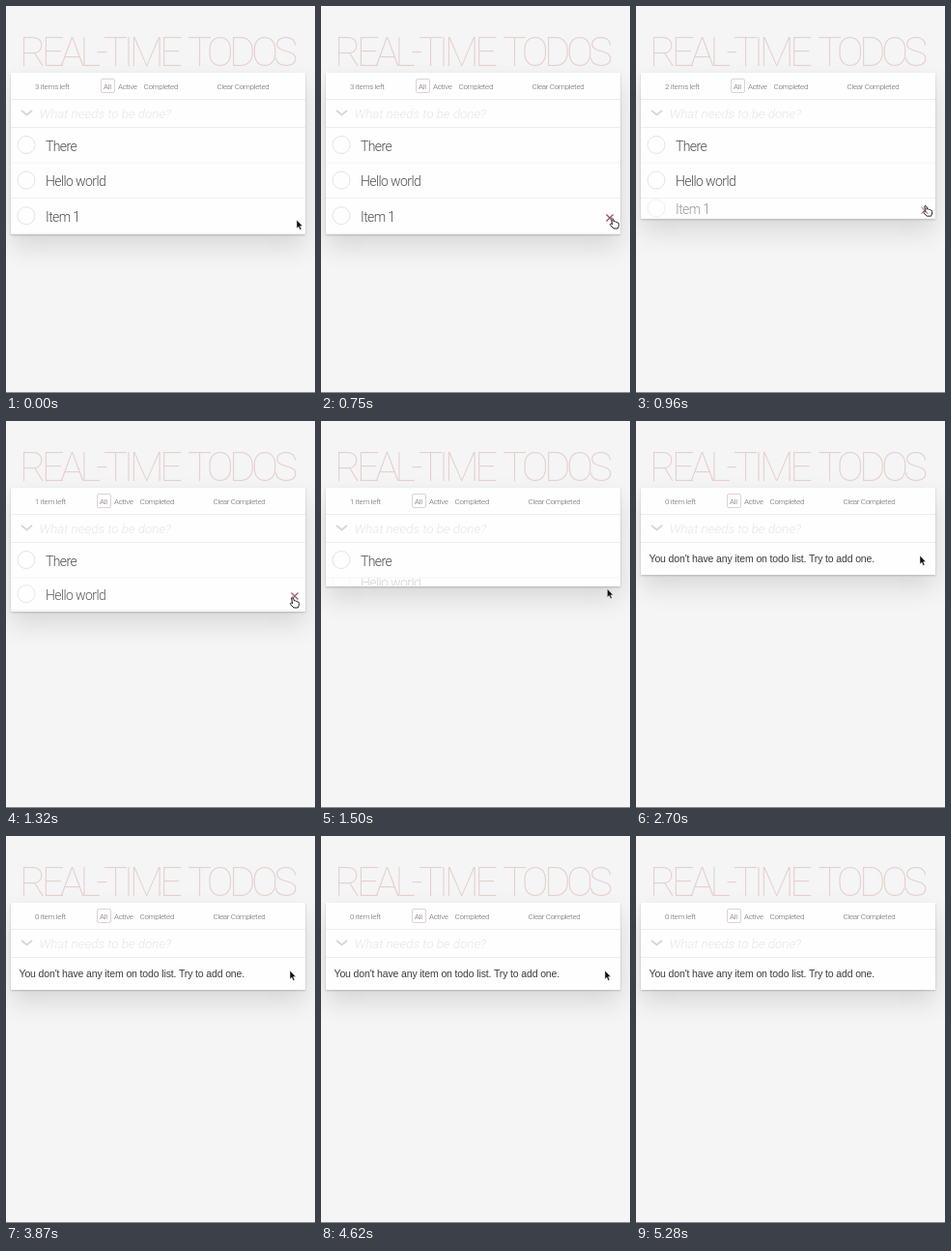
An HTML page for the animation above (5310 ms loop, 320x400 px).

```html
<!DOCTYPE html>
<html lang="en">
<head>
<meta charset="utf-8">
<title>Real-time todos</title>
<style>
  html, body { margin: 0; width: 100%; height: 100%; overflow: hidden; background: #f5f5f5; }
  #card {
    position: absolute; left: 5px; top: 69px; width: 305px; background: #fefefe;
    box-shadow: 0 1px 2px rgba(0, 0, 0, .2), 0 13px 25px rgba(0, 0, 0, .12);
  }
  #stage { position: absolute; left: 0; top: 0; }
  text { font: 300 14px Roboto, "Open Sans", sans-serif; letter-spacing: -.6px; fill: #4d4d4d; }
  .title text { font-size: 42px; font-weight: 100; letter-spacing: -4.7px; fill: #e6cfcf; }
  .bar text { font-size: 8px; letter-spacing: -.3px; fill: #666; }
  .hint { font-size: 13.5px; font-style: italic; letter-spacing: -.06px; fill: #e6e6e6; }
  #empty text { font: 10.5px "Liberation Sans", Arial, sans-serif; letter-spacing: -.14px; fill: #3c3c3c; }
  .line { stroke: #ededed; }
  .ring { fill: none; stroke: #e4e4e4; }
  #cross { stroke: #96505a; stroke-width: 1.3; }
</style>
</head>
<body>
<div id="card"></div>
<svg id="stage" width="320" height="400">
  <rect y="399" width="320" height="1" fill="#8a8a8a"/>
  <g class="title">
    <text x="14" y="61.5">REAL-TIME</text>
    <text x="188" y="61.5">TODOS</text>
  </g>
  <g class="bar">
    <text id="count" x="30" y="86"></text>
    <g id="filters">
      <rect x="98.5" y="75.5" width="14" height="14" rx="1.5" fill="none" stroke="#e0d2d2"/>
      <text x="101" y="86">All</text>
      <text x="116" y="86">Active</text>
      <text x="142.5" y="86">Completed</text>
      <text x="218.5" y="86">Clear Completed</text>
    </g>
  </g>
  <path class="line" d="M5 96.5H310M5 125.5H310"/>
  <path d="M16 108L21.5 112.5L27 108" fill="none" stroke="#d8d8d8" stroke-width="2"/>
  <text class="hint" x="34.5" y="116">What needs to be done?</text>
  <g id="rows"></g>
  <g id="empty"><text x="13.5" y="20">You don't have any item on todo list. Try to add one.</text></g>
  <path id="arrow" d="M0 0V9L2 7.2L3.5 10.5L5 9.8L3.6 6.6H6.2Z" fill="#111" stroke="#fff" stroke-width=".5"/>
  <path id="hand" d="M1 .8Q2.2 -.6 3 1L4 4Q5 3.2 5.8 4.3Q7 3.8 7.5 5Q9 4.8 9 6.5Q9 9 7.8 11H3.5L.2 7.6Q-.6 6 .8 6L2.2 6.8Z"
    fill="#fff" stroke="#222"/>
  <path id="cross" d="M-3.5 -3.5L3.5 3.5M3.5 -3.5L-3.5 3.5"/>
</svg>
<script>
const LOOP = 5310, TOP = 126, ROW = 36.6, EMPTY = 33, HOVER = 330;
const $ = id => document.getElementById(id);

// Each row leaves when its cross is clicked.
const items = [
  { text: "There", gone: 2000 },
  { text: "Hello world", gone: 1285 },
  { text: "Item 1", gone: 850 }
];
// Pointer: time, x, y
const path = [
  [0, 301, 221], [300, 301, 221], [450, 302, 219], [850, 302, 219], [1130, 297, 182],
  [1400, 297, 182], [1750, 294, 139], [4850, 294, 139], [5220, 306, -14]
];

$("rows").innerHTML = items.map(item => `
  <svg x="5" width="305"><g>
    <circle class="ring" cx="16" cy="-.8" r="9"/>
    <text x="36" y="5.2">${item.text}</text>
  </g><path class="line" d="M0 -.5H305"/></svg>`).join("");
const rows = [...$("rows").children];

// Critically damped spring from 1 to 0
const spring = ms => ms <= 0 ? 1 : (1 + .013 * ms) * Math.exp(-.013 * ms);
const move = (node, x, y) => node.setAttribute("transform", `translate(${x} ${y})`);
const show = (node, on) => node.style.display = on ? "" : "none";

function pointer(t) {
  const i = path.findIndex(p => p[0] > t);
  if (i < 0) return path[path.length - 1].slice(1);
  const [a, b] = [path[i - 1], path[i]];
  const u = (t - a[0]) / (b[0] - a[0]), e = u * u * (3 - 2 * u);
  return [a[1] + (b[1] - a[1]) * e, a[2] + (b[2] - a[2]) * e];
}

function draw(t) {
  const left = items.filter(item => t < item.gone).length;
  const [px, py] = pointer(t);
  let y = TOP, hover = null;

  rows.forEach((row, i) => {
    const s = spring(t - items[i].gone), h = ROW * s;
    show(row, h > .3);
    if (h <= .3) return;
    row.setAttribute("y", y);
    row.setAttribute("height", h);
    row.style.opacity = s;
    move(row.firstElementChild, 0, h / 2);
    move(row.lastElementChild, 0, h);
    if (t > HOVER && py >= y && py < y + h) hover = { y: y + h / 2 + 1.5, opacity: s };
    y += h;
  });
  move($("empty"), 0, y);
  if (!left) y += EMPTY;

  $("card").style.height = y - 69 + "px";
  $("count").textContent = `${left} item${left > 1 ? "s" : ""} left`;
  move($("filters"), left > 1 ? 0 : -4, 0);
  show($("empty"), !left);
  show($("cross"), hover);
  show($("hand"), hover);
  show($("arrow"), !hover);
  if (hover) {
    move($("cross"), 299, hover.y);
    $("cross").style.opacity = hover.opacity;
  }
  move($("hand"), px - 2.5, py);
  move($("arrow"), px, py);
}

function tick() {
  draw(performance.now() % LOOP);
  requestAnimationFrame(tick);
}
tick();
</script>
</body>
</html>
```
